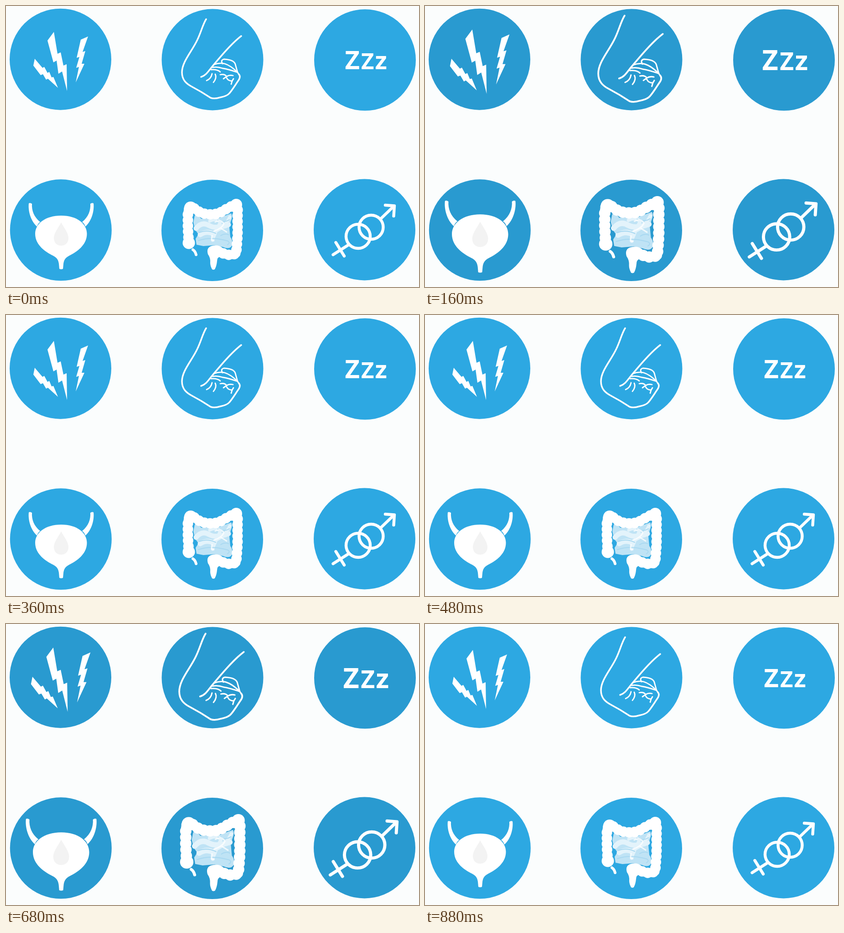
These frames come from a looping animation (906x618 px, 2.88 s). An HTML page:

```html
<!DOCTYPE html>
<html lang="en">
<head>
<meta charset="utf-8">
<title>Pulsing symptom icons</title>
<style>
html, body { margin: 0; width: 906px; height: 618px; overflow: hidden; background: #fbfdfd; }
svg { display: block; }
.icon { fill: #fff; }
.line { fill: none; stroke-linecap: round; stroke-linejoin: round; }
text { font: 700 56px "Open Sans", "Noto Sans", sans-serif; }
</style>
</head>
<body>
<svg width="906" height="618" viewBox="0 0 906 618">
  <defs>
    <path id="horn" d="M50 434Q53 432 57 435C56 449 61 464 75 475Q70 478 68 485C54 473 48 450 50 434Z"/>
    <path id="colon" d="M401 521L399 490 399 452Q402 440 415 446C426 457 442 459 455 458C474 457 485 441 506 437Q509 442 508 460L508 505 505 544Q492 550 478 545Q469 539 459 539"/>
  </defs>
  <g id="discs">
    <circle cx="119.5" cy="117.2" r="111.5"/>
    <circle cx="453" cy="118" r="111.5"/>
    <circle cx="787.5" cy="118.8" r="111.5"/>
    <circle cx="120.3" cy="492.8" r="111.5"/>
    <circle cx="452.5" cy="493.6" r="111.5"/>
    <circle cx="786.5" cy="492" r="111.5"/>
  </g>

  <!-- pain -->
  <g class="icon">
    <path d="M63 116L80 136 84 134 91 147 95 145 100 157 104 156 114 180 92 160 88 162 81 150 76 152 60 131Z"/>
    <path d="M105 57L113 105 120 102 126 131 133 128 134 187 123 144 115 149 111 120 104 124 91 76Z"/>
    <path d="M180 67L168 101 174 99 166 127 172 127 153 168 160 134 154 136 161 112 155 114 164 74Z"/>
  </g>

  <!-- arm -->
  <g class="icon">
    <g class="line" stroke="#fff" stroke-width="3.5">
      <path d="M439 29C431 42 428 58 419 76C407 101 386 123 386 146C386 163 396 171 407 177C424 186 437 194 449 202Q457 205 470 201Q485 198 490 192C497 184 504 172 511 162Q515 155 511 150"/>
      <path d="M516 66C495 82 470 112 450 136C443 145 438 153 428 156"/>
      <g stroke-width="2.8">
        <path d="M475 127Q470 119 478 117Q500 118 503 128L508 146 513 154"/>
        <path d="M456 129Q468 124 480 127Q493 131 508 146"/>
        <path d="M453 135Q464 133 475 137Q488 139 508 146"/>
        <path d="M450 140Q464 139 470 145M459 150Q463 158 455 168M452 149Q450 160 440 164"/>
        <path d="M470 151Q480 149 484 155Q490 151 498 153M484 155L477 160M484 158Q487 165 496 165L494 172M496 165L499 160"/>
      </g>
    </g>
  </g>

  <!-- sleep -->
  <g class="icon">
    <text y="139"><tspan x="743.5">Z</tspan><tspan x="779" font-size="49">Z</tspan><tspan x="809.5" font-size="54">z</tspan></text>
  </g>

  <!-- bladder -->
  <g class="icon">
    <use href="#horn"/>
    <use href="#horn" transform="translate(242) scale(-1 1)"/>
    <path d="M121 461C156 461 177.5 479 177.5 501C177.5 527 153 542 139 549C129 554 127 560 126 567L125 578Q121 580 117 578L116 567C115 560 113 554 103 549C89 542 64 527 64 501C64 479 86 461 121 461Z"/>
    <path fill="#f3f3f3" d="M121 476C126 486 137 499 137 510C137 521 130 527 121 527C112 527 105 521 105 510C105 499 116 486 121 476Z"/>
  </g>

  <!-- bowel -->
  <g class="icon">
    <path fill="#bfe3f5" d="M414 461Q422 457 428 468L468 466 494 456Q498 463 493 474L490 486 492 508Q499 517 495 528Q489 536 476 530L458 526 433 528 418 525 416 512 422 502 415 492 411 476Z"/>
    <g class="line" stroke="#e3f3fb" stroke-width="11">
      <path d="M417 489Q430 473 446 483Q460 491 488 481M426 503Q441 493 456 502"/>
      <path stroke-width="7" d="M447 473Q462 465 470 476Q461 493 453 515M491 464Q480 487 460 495"/>
    </g>
    <g class="line" stroke="#a9d9f1" stroke-width="2">
      <path d="M424 498Q442 491 460 500M422 516Q450 506 487 517Q493 521 486 525M464 471Q480 477 490 470M471 505Q480 499 488 503"/>
    </g>
    <g class="line" stroke="#fff" stroke-width="3" opacity=".75">
      <path d="M459 475Q472 468 478 479Q473 490 456 495M470 488L484 497M452 505Q449 518 456 516"/>
    </g>
    <g class="line" stroke="#fff">
      <use href="#colon" stroke-width="19"/>
      <use href="#colon" stroke-width="23" stroke-dasharray="0 12.5"/>
      <path stroke-width="6" d="M410 536Q415 539 417 547"/>
    </g>
    <circle cx="401" cy="521" r="13.5"/>
    <circle cx="405" cy="444" r="14"/>
    <circle cx="505" cy="437" r="13"/>
    <path d="M443 546Q439 532 450 528Q466 523 476 533L470 551Q463 553 463 561Q462 572 458 579Q455 581 452 579Q448 571 448 565Q449 554 443 546Z"/>
  </g>

  <!-- intimacy -->
  <g class="icon">
    <g class="line" stroke="#fff" stroke-width="6.4">
      <circle cx="772.5" cy="506.5" r="26.5"/>
      <circle cx="801" cy="486.5" r="26.5"/>
      <path d="M822 468L851 440M832 438L852 439.5 850.5 462M751 525.5L717.5 547M723.5 520L742 550"/>
    </g>
  </g>
</svg>
<script>
const LOOP = 2880, STEP = 40, MOTION_END = 880;
const BEAT = 520, START = 20, HOLD = 140, FADE = 110, GROW = 0.088;
const discs = document.getElementById("discs");
const icons = [...document.querySelectorAll(".icon")];
const pivots = [...discs.children].map(c => [+c.getAttribute("cx"), +c.getAttribute("cy")]);
const light = [45, 168, 226], dark = [41, 154, 208];

const easeOut = x => 1 - (1 - Math.min(1, Math.max(0, x))) ** 2.4;

// Two quick swells, then rest until the loop restarts.
function swell(t) {
  if (t < START || t >= MOTION_END) return 0;
  const u = (t - START) % BEAT;
  return u < HOLD ? easeOut(u / FADE) : 1 - easeOut((u - HOLD) / FADE);
}

function draw(now) {
  const t = Math.floor((now % LOOP) / STEP) * STEP;
  const k = swell(t), s = 1 + GROW * k;
  discs.setAttribute("fill", `rgb(${light.map((c, i) => Math.round(c + (dark[i] - c) * k))})`);
  icons.forEach((icon, i) => {
    const [x, y] = pivots[i];
    icon.setAttribute("transform", `translate(${x} ${y}) scale(${s}) translate(${-x} ${-y})`);
  });
  requestAnimationFrame(() => draw(performance.now()));
}
draw(performance.now());
</script>
</body>
</html>
```
